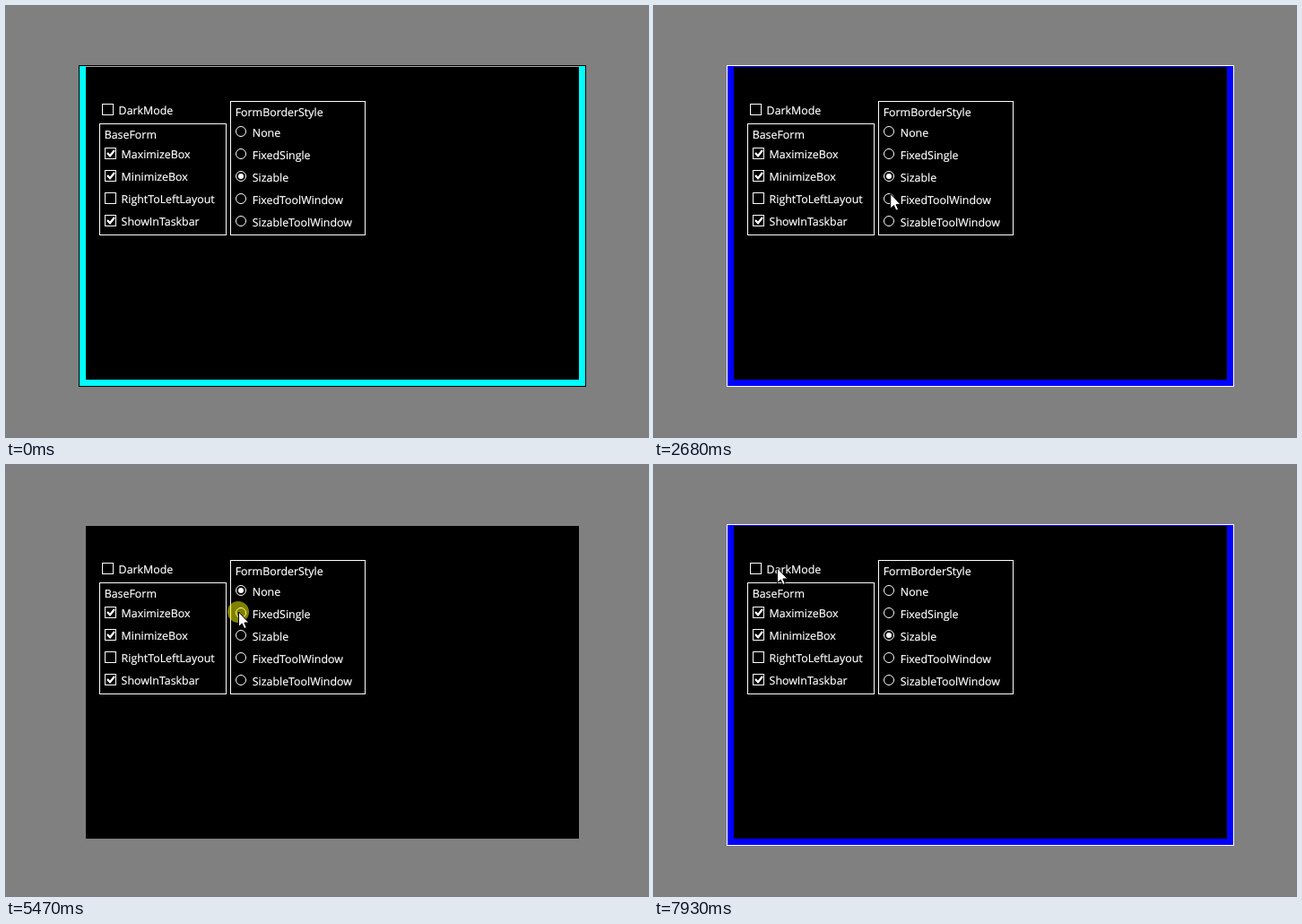
Animation, 716 px wide and 481 px high, one loop 8 s. Source, as an HTML page:

```html
<!DOCTYPE html>
<html lang="en">
<head>
<meta charset="utf-8">
<style>
html, body { margin: 0; width: 100%; height: 100%; overflow: hidden; background: #808080; }
svg { display: block; }
text { font: 12.4px "Open Sans", "Noto Sans", sans-serif; fill: #fff; stroke: #fff; stroke-width: .2; text-rendering: geometricPrecision; }
.line { fill: #000; stroke: #fff; }
.tick { fill: none; stroke: #fff; stroke-width: 2.3; }
</style>
</head>
<body>
<svg width="716" height="481">
  <g id="frame">
    <rect id="edge" x="81.5" y="66.5" width="565" height="358"/>
    <path id="shine" d="M89 67.5H639" stroke="#aaa"/>
    <path id="streak" d="M422 417h3v7h-3z" fill="#5ff"/>
  </g>
  <rect x="89" y="68" width="550" height="349"/>
  <g id="form"></g>
  <g id="glitch">
    <path d="M252 204h12v48h-12z"/>
    <path d="M258.5 205v20m0 5v20" stroke="#fff"/>
  </g>
  <g id="pointer">
    <circle id="halo" r="12" fill="#ff0" fill-opacity=".5"/>
    <path d="M.5 0V16.5L4.2 13L6.7 18.6L9.3 17.4L6.9 12H11.8Z" fill="#fff" stroke="#000"/>
  </g>
</svg>
<script>
const LOOP = 8000, HOLD = 70, REST = 200, ROW = 25;
const options = ["None", "FixedSingle", "Sizable", "FixedToolWindow", "SizableToolWindow"];
const toggles = ["MaximizeBox", "MinimizeBox", "RightToLeftLayout", "ShowInTaskbar"];

const $ = id => document.getElementById(id);
const show = (id, on) => $(id).setAttribute("display", on ? "inline" : "none");
const label = (x, y, s) => `<text x="${x}" y="${y}">${s}</text>`;
const box = (x, y, w, h) => `<rect class="line" x="${x}.5" y="${y}.5" width="${w}" height="${h}"/>`;
const group = (x, y, w, h, s) => box(x, y, w, h) + label(x + 5.7, y + 17, s);
const radioY = i => 140 + ROW * i;

function check(x, y, s, on = true) {
  const tick = `<path id="${s}" class="tick" d="M${x + 3} ${y + 6}l3 3.3l5 -6.3"/>`;
  return box(x, y, 12, 12) + (on ? tick : "") + label(x + 18.6, y + 12, s);
}

const radio = (s, i) =>
  `<circle class="line" cx="262" cy="${radioY(i)}" r="5.5"/>` + label(274.8, radioY(i) + 6, s);

$("form").innerHTML =
  check(107, 109, "DarkMode") +
  group(104, 131, 141, 124, "BaseForm") +
  toggles.map((s, i) => check(110, 158 + ROW * i, s, s != "RightToLeftLayout")).join("") +
  group(250, 106, 150, 149, "FormBorderStyle") +
  options.map(radio).join("") +
  `<circle id="dot" cx="262" r="3" fill="#fff"/>`;

// The pointer leaves right after the previous click unless told otherwise.
const visits = [
  { x: 419, y: 335, click: 1600, leave: 1060 },
  { x: 260, y: 207, click: 3080, leave: 2150, pick: "FixedToolWindow" },
  { x: 261, y: 237, click: 3630, pick: "SizableToolWindow" },
  { x: 266, y: 138, click: 4390, pick: "None" },
  { x: 259, y: 164, click: 5470, leave: 4730, pick: "FixedSingle" },
  { x: 262, y: 184, click: 6240, pick: "Sizable" },
  { x: 137, y: 114, click: 7130, pick: "DarkMode" },
  { x: 137, y: 115, click: 7530, pick: "DarkMode" }
];
visits.forEach((v, i) => v.leave ??= visits[i - 1].click + HOLD);

function pointerAt(t) {
  let x = 424, y = 481;
  for (const v of visits) {
    const p = Math.min(1, Math.max(0, (t - v.leave) / (v.click - REST - v.leave)));
    const e = 1 - (1 - p) ** 3;
    x += (v.x - x) * e;
    y += (v.y - y) * e;
  }
  return `translate(${x} ${y})`;
}

function draw(t) {
  const done = visits.filter(v => t >= v.click + HOLD);
  const picks = done.map(v => v.pick);
  const choice = picks.filter(s => options.includes(s)).pop() ?? "Sizable";
  const active = done.length > 0;
  const fill = active ? "#00f" : "#0ff";

  $("edge").setAttribute("fill", fill);
  $("edge").setAttribute("stroke", active ? "#fff" : "#000");
  $("shine").setAttribute("stroke", active ? fill : "#aaa");
  show("frame", choice != "None");
  show("streak", t > visits[0].click - REST && !active);
  show("glitch", choice == "None" && t < done.at(-1).click + 2 * HOLD);
  show("DarkMode", picks.filter(s => s == "DarkMode").length % 2);
  $("dot").setAttribute("cy", radioY(options.indexOf(choice)));

  show("halo", visits.some(v => t >= v.click && t < v.click + HOLD));
  show("pointer", t >= visits[0].leave);
  $("pointer").setAttribute("transform", pointerAt(t));
}

const start = performance.now();
function tick(now) {
  draw(Math.max(0, now - start) % LOOP);
  requestAnimationFrame(tick);
}
draw(0);
requestAnimationFrame(tick);
</script>
</body>
</html>
```
